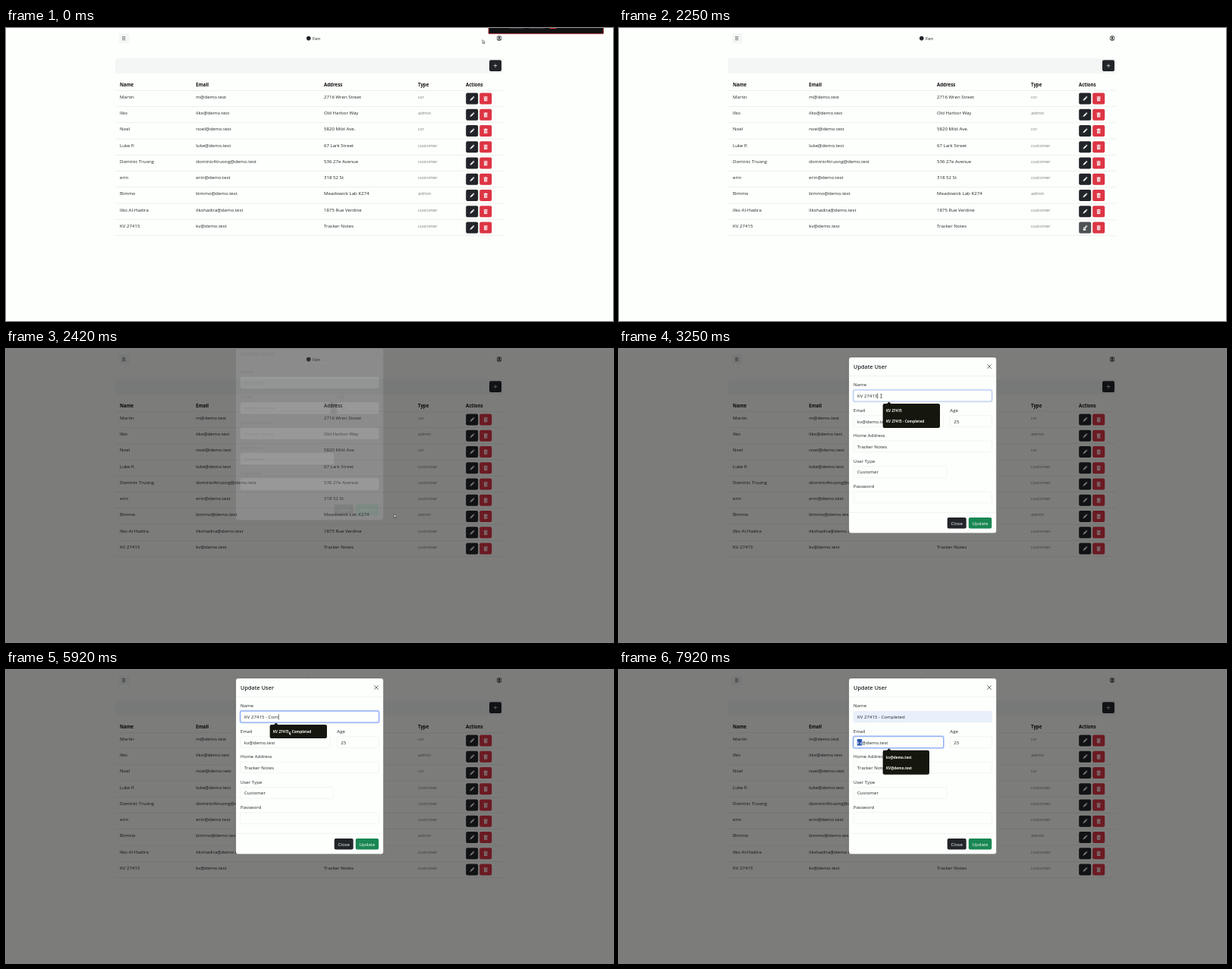
Write an HTML page with a canvas that moves like this. It is 800 px wide and 386 px high and loops after 8 s.

```html
<!DOCTYPE html>
<html lang="en">
<head>
<meta charset="utf-8">
<title>Update User</title>
<style>
html, body { margin: 0; width: 100%; height: 100%; overflow: hidden; background: #fdfffc; }
canvas { display: block; width: 100vw; height: 100vh; }
</style>
</head>
<body>
<canvas id="stage"></canvas>
<script>
const W = 800, H = 386, LOOP = 8000, STEP = 1000 / 12;
const PAPER = '#fdfffc', INK = '#212529', RED = '#dc3545', GREEN = '#198754';
const canvas = document.getElementById('stage');
const ctx = canvas.getContext('2d');
const ratio = window.devicePixelRatio || 1;
canvas.width = W * ratio;
canvas.height = H * ratio;

const ROWS = [
  ['Martin', 'm@demo.test', '2716 Wren Street', 'csr'],
  ['Ilko', 'ilko@demo.test', 'Old Harbor Way', 'admin'],
  ['Noel', 'noel@demo.test', '5820 Mild Ave.', 'csr'],
  ['Luke P.', 'luke@demo.test', '67 Lark Street', 'customer'],
  ['Dominic Truong', 'dominic4truong@demo.test', '536 27e Avenue', 'customer'],
  ['erin', 'erin@demo.test', '318 52 St', 'customer'],
  ['Bimmo', 'bimmo@demo.test', 'Meadowick Lab K274', 'admin'],
  ['Ilko Al-Hadira', 'ilkohadira@demo.test', '1875 Rue Verdine', 'customer'],
  ['KV 27415', 'kv@demo.test', 'Tracker Notes', 'customer']
];
const COLS = [150, 250.3, 419, 543, 606];
const NAME = 'KV 27415', DONE = NAME + ' - Completed';

// [time, text] of the name field
const TYPING = [
  [0, ''], [3660, ' '], [3825, ' -'], [3910, ' - '], [4160, ' - C'],
  [4410, ' - Co'], [4495, ' - Cop'], [5075, ' - Co'], [5410, ' - Com'], [5990, ' - Completed']
];
// [time, x, y] of the pointer
const PATH = [
  [0, 628, 15.5], [80, 627, 17], [830, 160, 257], [1250, 192, 259], [1670, 600, 261],
  [1830, 611, 261], [2330, 612, 262], [2417, 511.5, 217.5], [2830, 380, 90], [3080, 345.5, 62],
  [5400, 345.5, 62], [5500, 373, 81], [6250, 373, 81], [7000, 318, 95.5], [8000, 317, 95.5]
];

const clamp = v => Math.max(0, Math.min(1, v));
const ramp = (t, from, len) => clamp((t - from) / len);
const easeOut = p => 1 - (1 - p) * (1 - p);
const smooth = p => p * p * (3 - 2 * p);

function box(x, y, w, h, r, fill, stroke, lw = 0.5) {
  ctx.beginPath();
  ctx.roundRect(x, y, w, h, r);
  if (fill) { ctx.fillStyle = fill; ctx.fill(); }
  if (stroke) { ctx.strokeStyle = stroke; ctx.lineWidth = lw; ctx.stroke(); }
}

function poly(points, fill, stroke, lw = 0.6) {
  ctx.beginPath();
  for (let i = 0; i < points.length; i += 2) ctx.lineTo(points[i], points[i + 1]);
  if (fill) { ctx.closePath(); ctx.fillStyle = fill; ctx.fill(); }
  if (stroke) { ctx.strokeStyle = stroke; ctx.lineWidth = lw; ctx.stroke(); }
}

function disc(x, y, r, fill) {
  ctx.beginPath();
  ctx.arc(x, y, r, 0, 7);
  ctx.fillStyle = fill;
  ctx.fill();
}

// y is the middle of the capitals
function text(s, x, y, color = INK, size = 6.1, weight = 400, align = 'left') {
  ctx.font = `${weight} ${size}px "Open Sans", "Noto Sans", sans-serif`;
  ctx.textAlign = align;
  ctx.fillStyle = color;
  ctx.fillText(s, x, y + size * 0.36);
  return ctx.measureText(s).width;
}

function faded(alpha, draw) {
  if (alpha <= 0) return;
  ctx.save();
  ctx.globalAlpha *= alpha;
  draw();
  ctx.restore();
}

function at(x, y, draw) {
  ctx.save();
  ctx.translate(x, y);
  draw();
  ctx.restore();
}

function pencil(x, y) {
  at(x, y, () => {
    ctx.rotate(Math.PI / 4);
    ctx.fillStyle = '#fff';
    ctx.fillRect(-1, -3.6, 2, 1.1);
    ctx.fillRect(-1, -2.1, 2, 3.9);
    poly([-1, 2, 1, 2, 0, 3.9], '#fff');
  });
}

function trash(x, y) {
  at(x, y, () => {
    ctx.fillStyle = '#fff';
    ctx.fillRect(-2.7, -2.6, 5.4, 0.9);
    ctx.fillRect(-0.9, -3.2, 1.8, 0.7);
    box(-2.1, -1.3, 4.2, 4.5, 0.6, '#fff');
    ctx.fillStyle = RED;
    for (const dx of [-1.1, 0, 1.1]) ctx.fillRect(dx - 0.2, -0.6, 0.4, 3);
  });
}

function drawPage(hover) {
  box(149, 7, 13.5, 13, 2, '#f4f6f5');
  ctx.fillStyle = '#444';
  for (const y of [11.4, 13.3, 15.2]) ctx.fillRect(153, y, 4.3, 0.7);
  disc(398.8, 13.6, 2.8, INK);
  text('Fen', 404, 13.8);

  disc(650, 13.5, 3.2, INK);
  disc(650, 13.5, 2.6, PAPER);
  disc(650, 12.7, 1.2, INK);
  ctx.beginPath();
  ctx.ellipse(650, 15.5, 2.1, 1.3, 0, Math.PI, 0);
  ctx.fill();

  box(144, 40, 511, 19.7, 1, '#f4f6f5');
  box(637, 42.3, 16, 14.8, 2, INK);
  ctx.fillStyle = '#fff';
  ctx.fillRect(642.6, 49.4, 4.8, 0.6);
  ctx.fillRect(644.7, 47.3, 0.6, 4.8);

  ['Name', 'Email', 'Address', 'Type', 'Actions'].forEach((s, i) => text(s, COLS[i], 74.8, '#111', 6.1, 700));
  ctx.fillStyle = '#e3e6e4';
  for (let i = 0; i <= ROWS.length; i++) ctx.fillRect(144, 82 + i * 21.25, 511, 0.6);

  ROWS.forEach((row, i) => {
    const y = 90.8 + i * 21.25, top = y - 5.2;
    row.forEach((s, c) => c < 3 ? text(s, COLS[c], y) : text(s, COLS[c], y, '#777b7a', 5.8));
    box(606.2, top, 16, 14.8, 2, hover && i === 8 ? '#4d5154' : INK);
    box(624.2, top, 16, 14.8, 2, RED);
    pencil(614.2, top + 7.5);
    trash(632.2, top + 7.5);
  });
}

function drawShareBar(t) {
  const y = -10 * smooth(ramp(t, 80, 330));
  if (y <= -9) return;
  at(0, y, () => {
    box(636, -6, 151.3, 13.6, 0.5, '#101214', '#b8343c', 1);
    box(664, -4, 19, 5, 1, '#35383a');
    box(689, -4, 21, 5, 1, '#35383a');
    box(716, -4, 10, 5, 1, '#d22f3a');
  });
}

function field(x, y, w, focus = 0, fill = PAPER) {
  box(x, y, w, 14.8, 2.2, fill, '#e6e9e7', 0.5);
  faded(focus, () => {
    box(x - 0.5, y - 0.5, w + 1, 15.8, 2.6, null, 'rgba(80,130,250,.42)', 1.7);
    box(x, y, w, 14.8, 2.2, null, '#86a8f4', 0.7);
  });
}

function caret(x, y) {
  ctx.fillStyle = '#111';
  ctx.fillRect(x + 0.2, y - 3.7, 0.6, 7.4);
}

function suggest(y, w, items, alpha) {
  faded(alpha, () => {
    box(347.7, y, w, 4 + items.length * 14, 2.2, '#15170e');
    poly([353, y + 0.2, 355.8, y - 2.6, 358.6, y + 0.2], '#15170e');
    items.forEach((s, i) => text(s, 352, y + 9.1 + i * 14, '#f4f5ee', 4.7, 700));
  });
}

function drawModal(t) {
  const nameFocus = 0.5 * ramp(t, 3080, 80) + 0.5 * ramp(t, 3300, 120) - ramp(t, 7160, 150);
  const mailFocus = ramp(t, 7160, 150);
  const typed = NAME + TYPING.filter(k => t >= k[0]).pop()[1];

  box(303, 11, 194.3, 231.5, 3, PAPER, 'rgba(0,0,0,.25)', 0.5);
  text('Update User', 309, 23.6, INK, 7.3, 600);
  poly([485.4, 20.4, 490.8, 25.8], null, '#555', 0.9);
  poly([490.8, 20.4, 485.4, 25.8], null, '#555', 0.9);
  ctx.fillStyle = '#e3e6e4';
  ctx.fillRect(303, 35.2, 194, 0.5);
  ctx.fillRect(303, 215.2, 194, 0.5);

  ['Name', 'Email', 'Home Address', 'User Type', 'Password'].forEach((s, i) => text(s, 309, 47.2 + i * 33.4));
  text('Age', 436.3, 80.6);

  const tint = ramp(t, 6320, 100);
  field(309, 54.2, 182.3, nameFocus, tint > 0 ? '#e8f0fc' : PAPER);
  field(309, 87.7, 118.5, mailFocus);
  field(436.3, 87.7, 55);
  field(309, 121, 182.3);
  field(309, 154.5, 123);
  field(309, 187.9, 182.3);

  const nameEnd = 314 + text(typed, 314, 61.9);
  if (t >= 3080 && t < 7160) caret(nameEnd, 61.9);

  const mail = ROWS[8][1];
  text(mail, 314, 95.5);
  if (t >= 7410) {
    ctx.font = '400 6.1px "Open Sans", "Noto Sans", sans-serif';
    const w = ctx.measureText('kv').width;
    ctx.fillStyle = '#2f5fc4';
    ctx.fillRect(313.8, 91, w + 0.3, 8.6);
    text('kv', 314, 95.5, '#fff');
  } else if (t >= 7160) caret(317, 95.5);
  text('25', 441.3, 95.5);
  text(ROWS[8][2], 314, 128.8);
  text('Customer', 314, 162.2);

  box(432.7, 222, 25, 14.6, 2, INK);
  text('Close', 445.2, 229.4, '#fff', 6.1, 500, 'center');
  box(460.8, 222, 30.4, 14.6, 2, GREEN);
  text('Update', 476, 229.4, '#fff', 6.1, 500, 'center');

  const shown = t < 5000
    ? ramp(t, 3080, 120) * (1 - ramp(t, 4480, 260))
    : ramp(t, 5020, 200) * (1 - ramp(t, 5950, 200));
  suggest(72, 75.3, t < 3660 ? [NAME, DONE] : [DONE], shown);
  suggest(105.8, 61.3, [mail, mail.replace('kv', 'KV')], ramp(t, 7240, 160));
}

function pointerAt(t) {
  const i = Math.max(1, PATH.findIndex(k => t < k[0]));
  const [a, b] = [PATH[i - 1], PATH[i]];
  const p = smooth(ramp(t, a[0], b[0] - a[0]));
  return [a[1] + (b[1] - a[1]) * p, a[2] + (b[2] - a[2]) * p];
}

function drawPointer(t, hover) {
  const [x, y] = pointerAt(t);
  const beam = (t > 3030 && t < 5410) || t > 6950;
  at(x, y, () => {
    if (beam) {
      ctx.fillStyle = '#222';
      ctx.fillRect(-0.3, -2.6, 0.6, 5.2);
      ctx.fillRect(-1.1, -2.9, 2.2, 0.5);
      ctx.fillRect(-1.1, 2.4, 2.2, 0.5);
    } else if (hover) {
      poly([0, 0, 1, 0, 1, 2, 3.6, 2.6, 3.4, 5, 0.6, 5, -1.3, 2.8, 0, 3], '#fff', '#333', 0.4);
    } else {
      poly([0, 0, 0, 4.8, 1.1, 3.8, 1.9, 5.4, 2.6, 5, 1.9, 3.5, 3.3, 3.4, 0, 0], '#fff', '#111', 0.5);
    }
  });
}

function draw(time) {
  const t = Math.floor((time % LOOP + 5) / STEP) * STEP;
  const hover = t > 1740 && t < 2400;
  ctx.setTransform(ratio, 0, 0, ratio, 0, 0);
  ctx.fillStyle = PAPER;
  ctx.fillRect(0, 0, W, H);
  drawPage(hover);
  drawShareBar(t);

  faded(0.51 * ramp(t, 2270, 140), () => {
    ctx.fillStyle = '#000';
    ctx.fillRect(0, 0, W, H);
  });
  faded(ramp(t, 2400, 150), () => {
    ctx.translate(0, -19.4 * (1 - easeOut(ramp(t, 2400, 300))));
    drawModal(t);
  });
  drawPointer(t, hover);
}

const start = performance.now();
function tick() {
  draw(performance.now() - start);
  requestAnimationFrame(tick);
}
tick();
</script>
</body>
</html>
```
